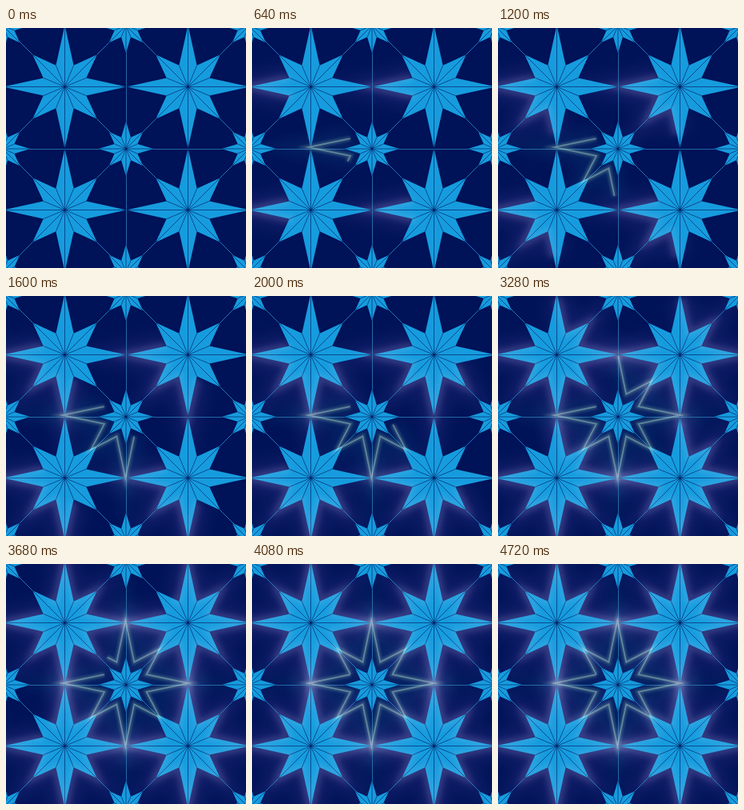
Animation, 300 px wide and 300 px high, one loop 4800 ms. Source, as an HTML page with a canvas:

```html
<!DOCTYPE html>
<html lang="en">
<head>
<meta charset="utf-8">
<title>Star tiles</title>
<style>
  html, body { margin: 0; width: 100%; height: 100%; overflow: hidden; background: #001258; }
  canvas { display: block; width: 300px; height: 300px; }
</style>
</head>
<body>
<canvas id="stage" width="300" height="300"></canvas>
<script>
const ctx = document.getElementById('stage').getContext('2d');
const NAVY = '#001258', BLUE = '#169cde';
const LOOP = 4800, STEP = 80, TRACE_TIME = 4010;
const CX = 150.5, CY = 150.5, PITCH = 154;
const BIG = { tip: 77, diagonal: 57, notch: 29 };
const SMALL = { tip: 34.5, diagonal: 30, notch: 15.5 };
const TRACE = { tip: 79, diagonal: 61, notch: 28.5 };
const TRACE_CENTER = [149.3, 149];

// Sixteen vertices, counterclockwise on screen from the notch above the left tip.
function starPoints(x, y, size) {
  return Array.from({ length: 16 }, (_, i) => {
    const angle = Math.PI + (1 - i) * Math.PI / 8;
    const r = i % 2 === 0 ? size.notch : i % 4 === 1 ? size.tip : size.diagonal;
    return [x + r * Math.cos(angle), y + r * Math.sin(angle)];
  });
}

function polyline(points) {
  ctx.beginPath();
  points.forEach(([x, y]) => ctx.lineTo(x, y));
}

function segment(x1, y1, x2, y2) {
  ctx.beginPath();
  ctx.moveTo(x1, y1);
  ctx.lineTo(x2, y2);
  ctx.stroke();
}

function drawStar(x, y, size) {
  const points = starPoints(x, y, size);
  polyline(points);
  ctx.closePath();
  ctx.fillStyle = BLUE;
  ctx.fill();
  ctx.strokeStyle = 'rgba(0,22,92,0.8)';
  ctx.lineWidth = 0.75;
  points.forEach(([px, py]) => segment(x, y, px, py));
}

// The part of a star outline covered after the given share of its length.
function partialOutline(x, y, size, share) {
  const points = starPoints(x, y, size);
  points.push(points[0]);
  const lengths = points.slice(1).map((p, i) => Math.hypot(p[0] - points[i][0], p[1] - points[i][1]));
  let left = share * lengths.reduce((a, b) => a + b);
  const path = [points[0]];
  for (let i = 0; i < lengths.length && left > 0; i++) {
    const k = Math.min(1, left / lengths[i]);
    const [a, b] = [points[i], points[i + 1]];
    path.push([a[0] + (b[0] - a[0]) * k, a[1] + (b[1] - a[1]) * k]);
    left -= lengths[i];
  }
  return path;
}

// Mitred joins let the glow run out past the sharp tips.
function glowLine(points, width, blur, color) {
  ctx.save();
  ctx.filter = `blur(${blur}px)`;
  ctx.globalCompositeOperation = 'screen';
  ctx.lineWidth = width;
  ctx.strokeStyle = color;
  polyline(points);
  ctx.stroke();
  ctx.restore();
}

const bigCenters = [];
for (const sx of [-1, 1]) {
  for (const sy of [-1, 1]) bigCenters.push([CX + sx * PITCH / 2, CY + sy * PITCH / 2]);
}

function drawSeams() {
  ctx.lineWidth = 0.9;
  ctx.strokeStyle = '#2a72ae';
  segment(CX, 0, CX, 300);
  segment(0, CY + 1, 300, CY + 1);
  ctx.strokeStyle = '#2080c4';
  bigCenters.forEach(([x, y]) => {
    segment(x - 77, y - 77, x + 77, y + 77);
    segment(x - 77, y + 77, x + 77, y - 77);
  });
}

function drawStars() {
  bigCenters.forEach(([x, y]) => drawStar(x, y, BIG));
  for (let i = -1; i <= 1; i++) {
    for (let j = -1; j <= 1; j++) drawStar(CX + i * PITCH - 0.5, CY + j * PITCH + 0.5, SMALL);
  }
}

function draw(time) {
  const share = Math.min(1, time / TRACE_TIME);
  const halos = bigCenters.map(([x, y]) => partialOutline(x, y, BIG, share));
  const trace = partialOutline(...TRACE_CENTER, TRACE, share);
  ctx.fillStyle = NAVY;
  ctx.fillRect(0, 0, 300, 300);
  if (share > 0) {
    halos.forEach(path => {
      glowLine(path, 38, 8, 'rgba(110,90,160,0.11)');
      glowLine(path, 12, 5, 'rgba(120,95,160,0.14)');
    });
    glowLine(trace, 26, 8, 'rgba(30,100,100,0.16)');
  }
  drawSeams();
  drawStars();
  if (share === 0) return;

  halos.forEach(path => glowLine(path, 10, 3, 'rgba(150,130,160,0.17)'));
  glowLine(trace, 6, 1.4, 'rgba(110,140,110,0.34)');
  glowLine(trace, 1.8, 0.5, 'rgba(130,165,120,0.5)');
}

const start = performance.now();
function tick() {
  const elapsed = (performance.now() - start) % LOOP;
  draw(Math.floor(elapsed / STEP) * STEP);
  requestAnimationFrame(tick);
}
tick();
</script>
</body>
</html>
```
